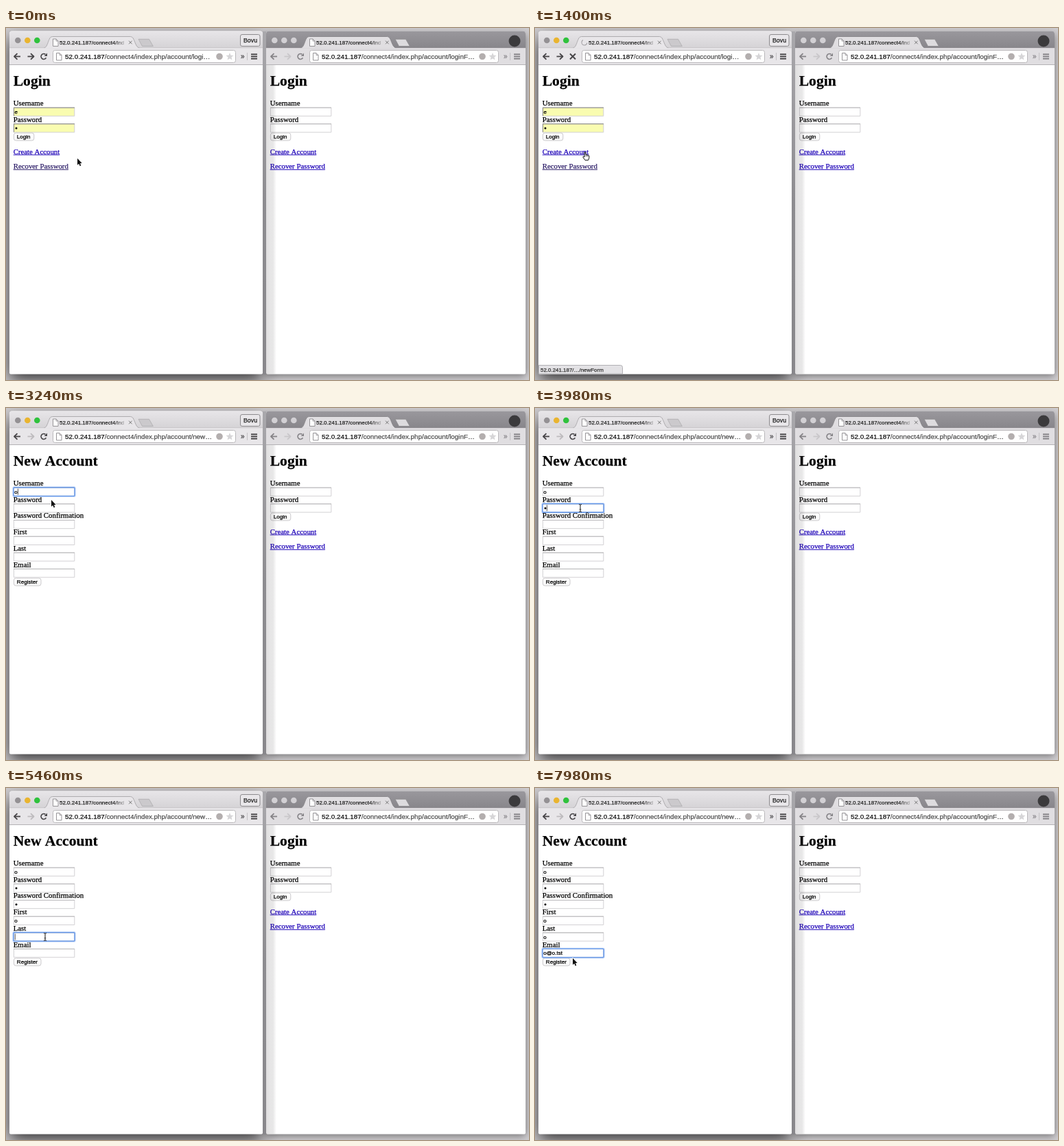
Write an HTML page with a canvas that moves like this. It is 762 by 513 pixels and loops after 8 s.

```html
<!DOCTYPE html>
<html lang="en">
<head>
<meta charset="utf-8">
<title>Account form</title>
<style>
html, body { margin: 0; width: 100%; height: 100%; overflow: hidden; background: #c6c4c7; }
canvas { display: block; }
</style>
</head>
<body>
<canvas id="stage" width="762" height="513"></canvas>
<script>
const ctx = document.getElementById('stage').getContext('2d');
const LOOP = 8000;
const SANS = '"Liberation Sans", Arial, sans-serif';
const SERIF = '"Liberation Serif", Times, serif';
const HOST = '52.0.241.187';
const ROW = 23.7;
const LABELS = ['Username', 'Password', 'Password Confirmation', 'First', 'Last', 'Email'];

// Timeline in ms
const LOAD = 1300, WAIT = 1480, COMMIT = 1570;
const FOCUS = [2140, 3480, 4200, 4900, 5380, 5940];
const TYPED = [3180, 3900, 4440, 5060, 5600];
const MAIL = 'o@o.tst';
const MAIL_KEYS = [6700, 6860, 7040, 7300, 7400, 7500, 7600];
const CARET_OFF = [[2500, 2780], [3040, 3180], [3760, 3900], [4740, 4900], [5940, 6240], [6500, 6700], [7900, 8000]];
const MOVES = [ // start, end, x, y
  [0, 0, 104, 190], [480, 780, 72, 181], [1800, 2000, 66, 116], [2140, 2240, 66, 127],
  [2500, 2780, 66, 134], [3280, 3460, 66, 146], [4000, 4160, 66, 170], [4440, 4540, 58, 194],
  [5180, 5340, 57, 217], [5730, 5800, 55, 238], [7740, 7860, 51, 246], [7860, 7970, 55, 248]
];

const clamp = v => Math.max(0, Math.min(1, v));
const ease = v => v * v * (3 - 2 * v);

// A hairline stroke gives the glyphs the heavier look of the desktop's smoothing.
function text(s, x, y, size, color = '#000', family = SANS, weight = '') {
  ctx.font = `${weight} ${size}px ${family}`;
  ctx.fillStyle = ctx.strokeStyle = color;
  ctx.lineWidth = 0.25;
  ctx.lineJoin = 'round';
  ctx.fillText(s, x, y);
  ctx.strokeText(s, x, y);
}

function box(x, y, w, h, r, fill, stroke, line = 1) {
  ctx.beginPath();
  ctx.roundRect(x, y, w, h, r);
  if (fill) { ctx.fillStyle = fill; ctx.fill(); }
  if (stroke) { ctx.strokeStyle = stroke; ctx.lineWidth = line; ctx.stroke(); }
}

function poly(points, fill, stroke, line = 1, close = true) {
  ctx.beginPath();
  points.forEach(([x, y]) => ctx.lineTo(x, y));
  if (close) ctx.closePath();
  if (fill) { ctx.fillStyle = fill; ctx.fill(); }
  if (stroke) { ctx.strokeStyle = stroke; ctx.lineWidth = line; ctx.stroke(); }
}

function disc(x, y, r, fill) {
  ctx.beginPath();
  ctx.arc(x, y, r, 0, 7);
  ctx.fillStyle = fill;
  ctx.fill();
}

function ramp(x0, y0, x1, y1, ...colors) {
  const g = ctx.createLinearGradient(x0, y0, x1, y1);
  colors.forEach((c, i) => g.addColorStop(i / (colors.length - 1), c));
  return g;
}

function arrow(x, dir, color) {
  poly([[x + dir * 4.5, 41.5], [x - dir * 4.5, 41.5]], null, color, 1.8, false);
  poly([[x, 37.2], [x + dir * 4.5, 41.5], [x, 45.8]], null, color, 1.8, false);
}

function reload(x, color) {
  ctx.beginPath();
  ctx.arc(x, 41.5, 3.9, 0.5, 5.4);
  ctx.strokeStyle = color;
  ctx.lineWidth = 1.7;
  ctx.stroke();
  poly([[x + 5, 36.5], [x + 5, 41], [x + 0.7, 41]], color);
}

function sheet(x, y) {
  poly([[x, y], [x + 4.5, y], [x + 7.5, y + 3], [x + 7.5, y + 10.5], [x, y + 10.5]], '#fff', '#8c8a8d', 0.9);
  poly([[x + 4.5, y], [x + 4.5, y + 3], [x + 7.5, y + 3]], null, '#8c8a8d', 0.8, false);
}

function star(x, y) {
  const pts = Array.from({ length: 10 }, (_, i) => {
    const a = i * Math.PI / 5 - Math.PI / 2, r = i % 2 ? 2.6 : 5.8;
    return [x + r * Math.cos(a), y + r * Math.sin(a)];
  });
  poly(pts, '#d6d5d7');
}

function tabShape(fill, stroke) {
  ctx.beginPath();
  ctx.moveTo(50, 29.5);
  ctx.bezierCurveTo(57, 28, 56, 12.5, 62.5, 12.5);
  ctx.lineTo(176.5, 12.5);
  ctx.bezierCurveTo(183, 12.5, 182, 28, 190, 29.5);
  ctx.fillStyle = fill;
  ctx.fill();
  ctx.strokeStyle = stroke;
  ctx.lineWidth = 1;
  ctx.stroke();
}

function chrome(w, o) {
  box(0, 4.5, w, 500, [4, 4, 2, 2], '#fff');
  box(0, 4.5, w, 25, [4, 4, 0, 0], ramp(0, 4, 0, 29, ...o.bar));
  o.lights.forEach((c, i) => disc(12.3 + 14 * i, 18, 4.3, c));
  ctx.fillStyle = o.edge;
  ctx.fillRect(0, 28.7, w, 0.8);
  tabShape(o.tool, o.edge);
  poly([[188, 16.3], [203.5, 16.3], [209.3, 26.5], [193.5, 26.5]], o.plus, o.edge, 0.8);
  ctx.fillStyle = o.tool;
  ctx.fillRect(0, 29.2, w, 24.3);
  ctx.fillStyle = '#b4b2b5';
  ctx.fillRect(0, 53, w, 1);

  if (o.spin !== null) {
    ctx.beginPath();
    ctx.arc(67, 21, 4, o.spin, o.spin + 4);
    ctx.strokeStyle = '#a3a1a5';
    ctx.lineWidth = 1.1;
    ctx.stroke();
  } else sheet(63.5, 16);
  text(HOST + '/connect4/ind', 73, 24, 8, ramp(150, 0, 169, 0, '#222', 'rgba(40,40,40,.1)'));
  poly([[174, 18.7], [178.6, 23.3]], null, '#777', 1, false);
  poly([[178.6, 18.7], [174, 23.3]], null, '#777', 1, false);

  arrow(11.5, -1, o.icon);
  arrow(31, 1, o.forward);
  if (o.spin !== null) {
    poly([[46, 37.5], [54, 45.5]], null, o.icon, 1.9, false);
    poly([[54, 37.5], [46, 45.5]], null, o.icon, 1.9, false);
  } else reload(50, o.icon);

  box(63.5, 32.5, w - 103, 18, 3, '#fff', '#b9b7ba');
  sheet(68.5, 36.5);
  text(HOST, 81, 45, 9.9, '#111');
  const hostW = ctx.measureText(HOST).width;
  text('/connect4/index.php/account/' + o.path + '…', 81 + hostW, 45, 9.9, '#505050');
  disc(w - 63, 41.5, 4.8, '#b3aeae');
  star(w - 48, 41.8);
  text('»', w - 32, 45, 10, o.icon);
  ctx.fillStyle = '#c4c2c5';
  ctx.fillRect(w - 23, 36, 1, 11);
  ctx.fillStyle = o.icon;
  for (let i = 0; i < 3; i++) ctx.fillRect(w - 17, 37.4 + 3.2 * i, 9, 1.9);
}

const body = (s, x, y, color) => text(s, x, y, 10.82, color, SERIF);
const title = s => text(s, 5.7, 84, 21.6, '#000', SERIF, 'bold');
const fieldY = i => 122.1 + ROW * i;

function link(s, y, color) {
  body(s, 5.7, y, color);
  ctx.fillRect(5.7, y + 1, ctx.measureText(s).width, 0.9);
}

function field(i, filled) {
  const y = fieldY(i) - 6;
  box(6.4, y, 88.4, 12.2, 0, filled ? '#f9fcb0' : '#fff', '#d2d1d3');
  ctx.fillStyle = filled ? '#85857f' : '#b9b8bb';
  ctx.fillRect(6, y - 0.5, 89, 1);
  if (filled) ctx.fillRect(6, y, 1, 12);
}

function button(s, y, w) {
  box(6.4, y, w, 11, 3, ramp(0, y, 0, y + 11, '#fff', '#f7f7f7'), '#c6c5c7', 0.9);
  text(s, 10.8, y + 8.3, 8.1);
}

function dot(i) { disc(10, fieldY(i) + 0.2, 1.5, '#000'); }

function loginPage(filled) {
  title('Login');
  for (let i = 0; i < 2; i++) {
    body(LABELS[i], 5.7, 113 + ROW * i);
    field(i, filled);
  }
  if (filled) {
    text('e', 7.6, 125, 8);
    dot(1);
  }
  button('Login', 153, 29.4);
  link('Create Account', 183.5, '#2006b8');
  link('Recover Password', 205, filled ? '#33246c' : '#2006b8');
}

function newPage(t) {
  title('New Account');
  const active = FOCUS.filter(f => t >= f).length - 1;
  const mail = MAIL.slice(0, MAIL_KEYS.filter(k => t >= k).length);
  button('Register', 248, 39.6);
  LABELS.forEach((label, i) => {
    body(label, 5.7, 113 + ROW * i);
    field(i, false);
    const y = fieldY(i);
    if (i === active) {
      box(5.4, y - 6.7, 90.2, 13.4, 1.5, null, 'rgba(110,160,240,.4)', 2.2);
      box(6, y - 6.2, 89, 12.4, 1, null, '#6496e8', 1.3);
    }
    const hidden = i === 1 || i === 2;
    const value = i === 5 ? mail : t >= TYPED[i] ? 'o' : '';
    if (hidden && value) dot(i);
    if (!hidden) text(value, 7.3, y + 2.8, 8);
    if (i === active && !CARET_OFF.some(([a, b]) => t >= a && t < b)) {
      ctx.font = `8px ${SANS}`;
      const x = value ? 7.5 + ctx.measureText(value).width : 7.8;
      ctx.fillStyle = '#444';
      ctx.fillRect(x, y - 4.5, 0.9, 9);
    }
  });
}

function status(s, w, alpha) {
  ctx.globalAlpha = alpha;
  box(0.5, 491.5, w, 12.5, [0, 3, 0, 0], '#e3e2e5', '#b1b0b4');
  text(s, 3, 500.5, 7.95, '#333');
  ctx.globalAlpha = 1;
}

function pointer(t) {
  let [, , x, y] = MOVES[0];
  for (const [a, b, nx, ny] of MOVES.slice(1)) {
    const k = ease(clamp((t - a) / (b - a)));
    x += (nx - x) * k;
    y += (ny - y) * k;
  }
  const onLink = t < 1800 && x < 79 && y < 186;
  const onField = t > COMMIT && LABELS.some((_, i) => Math.abs(y - fieldY(i)) < 6.5);
  ctx.save();
  ctx.translate(x, y);
  ctx.lineJoin = 'round';
  if (onLink) {
    poly([[0, 0], [1.6, 0], [2.2, 4], [4, 3.7], [5.2, 4.6], [6.8, 5.2], [6.8, 8.5], [5.6, 11.7],
      [1, 11.7], [-2, 7.5], [-1.8, 6.2], [0.2, 7]], '#fff', '#111', 1);
    poly([[2.4, 4], [2.8, 6.5]], null, '#111', 0.7, false);
    poly([[4.5, 4.3], [4.7, 6.5]], null, '#111', 0.7, false);
  } else if (onField) {
    poly([[-2, -5.6], [0, -4.8], [2, -5.6]], null, '#222', 1, false);
    poly([[0, -4.8], [0, 4.8]], null, '#222', 1.1, false);
    poly([[-2, 5.6], [0, 4.8], [2, 5.6]], null, '#222', 1, false);
    poly([[-1.3, 1.8], [1.3, 1.8]], null, '#222', 0.8, false);
  } else {
    const shape = [[0, 0], [0, 9.8], [2.2, 7.8], [3.7, 11.2], [5.3, 10.5], [3.9, 7.2], [6.7, 7]];
    poly(shape, null, '#fff', 1.8);
    poly(shape, '#111');
  }
  ctx.restore();
}

function backdrop() {
  ctx.fillStyle = '#cfcdd0';
  ctx.fillRect(0, 0, 762, 513);
  ctx.save();
  ctx.shadowColor = 'rgba(0,0,0,.45)';
  ctx.shadowBlur = 12;
  ctx.shadowOffsetY = 3;
  box(379, 6, 378, 498, 4, '#fff');
  ctx.shadowColor = 'rgba(0,0,0,.75)';
  ctx.shadowBlur = 24;
  ctx.shadowOffsetY = 9;
  box(5, 6, 369, 498, 4, '#fff');
  ctx.restore();
  ctx.fillStyle = ramp(0, 4, 0, 505, '#a9a8ac', '#8d8c90', '#88878b');
  ctx.fillRect(374, 5, 5, 500);
}

function rightWindow() {
  ctx.save();
  ctx.translate(379, 0);
  chrome(378, {
    bar: ['#9a989d', '#88868b'], lights: ['#d2d0d4', '#d2d0d4', '#d2d0d4'],
    edge: '#8b898d', tool: '#e0dee1', plus: '#dddbde', icon: '#858387',
    forward: '#c9c7ca', spin: null, path: 'loginF'
  });
  disc(362, 19, 8.5, '#3b3a3c');
  loginPage(false);
  ctx.fillStyle = ramp(0, 0, 15, 0, 'rgba(60,55,60,.17)', 'rgba(60,55,60,.13)', 'rgba(60,55,60,.12)', 'rgba(60,55,60,0)');
  ctx.fillRect(0, 54, 15, 450);
  ctx.restore();
}

function leftWindow(t) {
  const fresh = t >= COMMIT;
  const loading = t >= LOAD && !fresh;
  ctx.save();
  ctx.translate(5, 0);
  chrome(369, {
    bar: ['#e8e6e9', '#d5d3d6'], lights: ['#949194', '#e9b42f', '#2fc23c'],
    edge: '#aeacaf', tool: '#e8e6e9', plus: '#cbc9cc', icon: '#474548',
    forward: fresh ? '#bdbbbe' : '#474548', spin: loading ? t / 110 : null,
    path: fresh ? 'new' : 'logi'
  });
  box(336.5, 9.5, 28.5, 17, 2.5, '#e9e7ea', '#8d8b8e');
  text('Bovu', 341, 21.2, 8.8, '#222');
  if (fresh) newPage(t); else loginPage(true);
  if (t >= 660 && t < WAIT) status(HOST + '/…/newForm', 122, clamp((t - 640) / 100));
  if (t >= WAIT && t < 1800) status('Waiting for ' + HOST + '...', 185, clamp((1800 - t) / 200));
  ctx.restore();
}

function draw(t) {
  backdrop();
  rightWindow();
  leftWindow(t);
  pointer(t);
}

const start = performance.now();
function tick(now) {
  draw(Math.max(0, now - start) % LOOP);
  requestAnimationFrame(tick);
}
draw(0);
requestAnimationFrame(tick);
</script>
</body>
</html>
```
